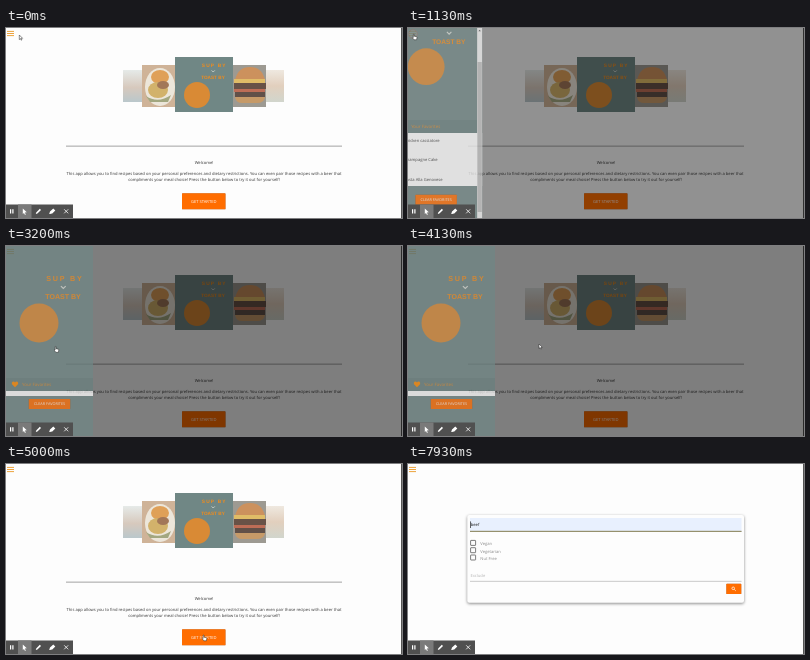
Animation of 396 by 190 pixels, one loop 8000 ms. Source, as an HTML page:

```html
<!DOCTYPE html>
<html lang="en">
<head>
<meta charset="utf-8">
<title>Recipe finder</title>
<style>
  html, body { margin: 0; width: 100%; height: 100%; overflow: hidden; background: #fdfdfd; }
  svg { display: block; width: 396px; height: 190px; }
  text { font: 4.12px "Open Sans", "Noto Sans", sans-serif; fill: #333; text-rendering: geometricPrecision; }
  .mid { text-anchor: middle; }
  .btn { fill: #ff6d00; filter: drop-shadow(0 .5px .6px #0006); }
  .btn-text { fill: #fff; text-anchor: middle; }
  .hint { fill: #b5b5b5; }
  .label { fill: #8a8a8a; }
  .brand { font: bold 4.8px "Liberation Sans", Arial, sans-serif; fill: #f28c1b; }
  .card { filter: drop-shadow(0 1px 1.8px #0007); }
</style>
</head>
<body>
<svg viewBox="0 0 396 190">
  <defs>
    <g id="logo">
      <rect width="58" height="55" fill="#708785"/>
      <circle cx="22" cy="38" r="13" fill="#d98a35"/>
      <text class="brand" x="26.8" y="10" letter-spacing="1.2">SUP BY</text>
      <path d="M36.6 13.4l1.6 1.6 1.6-1.6" fill="none" stroke="#d8dcd6" stroke-width=".8"/>
      <text class="brand" x="26.2" y="22" style="font-size:4.7px">TOAST BY</text>
    </g>
    <clipPath id="photo"><rect width="33" height="42"/></clipPath>
    <linearGradient id="warm" x2="0" y2="1">
      <stop stop-color="#d9c9b4"/><stop offset=".5" stop-color="#b98b5e"/><stop offset="1" stop-color="#8f9a84"/>
    </linearGradient>
    <linearGradient id="cool" x2="0" y2="1">
      <stop stop-color="#c9d3cf"/><stop offset=".55" stop-color="#a8896f"/><stop offset="1" stop-color="#68868f"/>
    </linearGradient>
  </defs>

  <g id="home">
    <rect x="117" y="42" width="19" height="32" fill="url(#cool)" opacity=".45"/>
    <rect x="260" y="42" width="18" height="32" fill="url(#warm)" opacity=".4"/>
    <g transform="translate(136 37)" clip-path="url(#photo)" opacity=".82">
      <rect width="33" height="42" fill="#c5a483"/>
      <ellipse cx="18" cy="22" rx="15" ry="19" fill="#e9e2d3"/>
      <ellipse cx="18" cy="12" rx="9" ry="7" fill="#d98c35"/>
      <ellipse cx="16" cy="25" rx="10" ry="8" fill="#c9a24c"/>
      <ellipse cx="21" cy="20" rx="6" ry="4" fill="#8f5a35"/>
      <path d="M4 31q12 8 25-1l-3 7H8z" fill="#8f9565"/>
    </g>
    <g transform="translate(227 37)" clip-path="url(#photo)" opacity=".85">
      <rect width="33" height="42" fill="#8d8980"/>
      <path d="M2 15Q5 2 17 2t15 13z" fill="#c47f42"/>
      <rect x="1" y="14" width="31" height="4" fill="#dbb14e"/>
      <rect x="1" y="18" width="32" height="6" fill="#4f3528"/>
      <rect x="1" y="24" width="31" height="3" fill="#b2543a"/>
      <rect x="2" y="27" width="30" height="5" fill="#463329"/>
      <path d="M2 32h30q-1 6-8 6H9q-6 0-7-6z" fill="#bd894f"/>
    </g>
    <use href="#logo" x="169" y="29"/>
    <rect x="60" y="117.7" width="276" height=".8" fill="#8c8c8c"/>
    <g class="mid">
      <text x="198" y="136">Welcome!</text>
      <text x="198" y="146.7">This app allows you to find recipes based on your personal preferences and dietary restrictions. You can even pair those recipes with a beer that</text>
      <text x="198" y="153.4">compliments your meal choice! Press the button below to try it out for yourself!</text>
    </g>
    <rect class="btn" x="176" y="165.3" width="43.5" height="16" rx=".6"/>
    <text class="btn-text" x="197.7" y="174.9">GET STARTED</text>
  </g>

  <g id="form">
    <rect class="card" x="59.3" y="51" width="276.7" height="87.8" rx="2" fill="#fdfdfd"/>
    <rect id="fill" x="62" y="54" width="271.5" height="13" fill="#e8f0fe"/>
    <text id="hint" class="hint" x="62.5" y="62.4">Main Ingredient</text>
    <text id="value" x="62.8" y="62.4" style="fill:#111">beef</text>
    <rect x="62" y="67" width="271.5" height=".6" fill="#a8a8a8"/>
    <rect id="line" x="62" y="66.8" width="271.5" height="1.1" fill="#8f8a63"/>
    <rect id="caret" x="62.2" y="57.4" width=".7" height="6.6" fill="#222"/>
    <g fill="none" stroke="#5c5c5c" stroke-width=".8">
      <rect x="62.6" y="76.4" width="5" height="5" rx=".4"/>
      <rect x="62.6" y="83.7" width="5" height="5" rx=".4"/>
      <rect x="62.6" y="91" width="5" height="5" rx=".4"/>
    </g>
    <text class="label" x="72.3" y="81.3">Vegan</text>
    <text class="label" x="72.3" y="88.5">Vegetarian</text>
    <text class="label" x="72.3" y="95.7">Nut Free</text>
    <text class="hint" x="62.5" y="112.5">Exclude</text>
    <rect x="62" y="116.9" width="271.5" height=".6" fill="#a8a8a8"/>
    <rect class="btn" x="318.3" y="119.8" width="15" height="10.3" rx=".6"/>
    <g fill="none" stroke="#fff" stroke-width=".7"><circle cx="325.2" cy="124.3" r="1.3"/><path d="M326.2 125.3l1.6 1.6"/></g>
  </g>

  <g fill="#eda33c">
    <rect x="1" y="2.9" width="7" height="1"/><rect x="1" y="5" width="7" height="1"/><rect x="1" y="7.1" width="7" height="1"/>
  </g>
  <rect x="395" width="1" height="190" fill="#555"/>
  <rect id="shade" width="396" height="190"/>

  <g id="panel" opacity=".72">
    <rect width="87" height="190" fill="#708785"/>
    <use id="panelLogo" href="#logo"/>
    <g id="favs">
      <rect y="132" width="87" height="13" fill="#68807e"/>
      <path d="M9 141.3l-2.8-2.9q-1.1-1.6.3-2.6 1.5-.8 2.5.7 1-1.5 2.5-.7 1.4 1 .3 2.6z" fill="#ff8a00"/>
      <text x="16" y="139.6" style="fill:#e08a2c;font-size:4.4px">Your Favorites</text>
      <rect id="listBox" y="145" width="87" fill="#fff"/>
      <g id="list">
        <text x="9" y="153.5">Chicken cacciatore</text>
        <text x="9" y="173.3">Champagne Cake</text>
        <text x="9" y="193">Pasta Alla Genovese</text>
      </g>
    </g>
    <g id="clear">
      <rect class="btn" x="-20.7" y="-5" width="41.4" height="10" rx=".6"/>
      <text class="btn-text" y="1.4" style="font-size:3.8px">CLEAR FAVORITES</text>
    </g>
    <g id="bar">
      <rect x="82" width="5" height="190" fill="#f1f1f1"/>
      <rect x="82.3" y="34" width="4.4" height="150" fill="#c1c1c1"/>
      <path d="M83.3 3.2h2.4l-1.2-1.4z" fill="#555"/>
    </g>
  </g>

  <g>
    <rect y="176.5" width="67" height="13.5" fill="#505050"/>
    <rect x="12" y="176.5" width="13.5" height="13.5" fill="#7a7a7a"/>
    <g fill="#fff">
      <path d="M4 181.2h1.2v4.2H4zM6.3 181.2h1.2v4.2H6.3z"/>
      <path d="M16.8 180.6l4 3.7-2 .2 1 2-.8.4-1-2-1.2 1.2z"/>
      <path d="M29.8 186l.4-1.6 3.6-3.6 1.2 1.2-3.6 3.6z"/>
      <path d="M43.2 186l.8-2.4 3.3-3 2 2-3 3-1.6.1-.3.3z"/>
    </g>
    <path d="M58.2 181.3l4 4m0-4l-4 4" stroke="#fff" stroke-width=".8"/>
  </g>

  <circle id="ring" fill="#fff6" stroke="#e0573a" stroke-width=".8"/>
  <g id="cursor" stroke-width=".5" stroke-linejoin="round">
    <path id="arrow" d="M0 0v4.6l1.1-1 .7 1.6.8-.3-.7-1.6h1.4z" fill="#fff" stroke="#222"/>
    <path id="hand" d="M.2 0q.7-.4.8.4v1.8l2.3.5q.6.2.5.8l-.4 2.3H.8L-.9 3.5q.2-.7 1 0z" fill="#fff" stroke="#222"/>
  </g>
</svg>
<script>
const LOOP = 8000, SWAP = 5400, CLEARED = 3000, FOCUS = 6400, PREVIEW = 6800;
const $ = id => document.getElementById(id);
const set = (id, attrs) => { for (const k in attrs) $(id).setAttribute(k, attrs[k]); };
const show = (id, on) => { $(id).style.display = on ? '' : 'none'; };
const clamp = v => Math.min(1, Math.max(0, v));
const outQuad = v => 1 - (1 - clamp(v)) ** 2;
const within = (t, a, b) => t >= a && t < b;

// time, x, y of the pointer tip
const path = [
  [0, 13.3, 7], [60, 13, 7], [530, 5.2, 6], [1130, 5.2, 6], [1730, 32.8, 70], [1860, 33, 72],
  [2060, 35, 82], [2200, 35, 84], [2660, 44, 169], [3000, 44, 169], [3200, 49, 100.5],
  [3800, 112, 94], [4130, 131, 98], [4330, 133, 99], [4400, 140.7, 103], [5000, 197, 171],
  [5400, 197, 171], [5950, 100, 61]
];
const clicks = [[930, 5, 6], [2900, 44, 169], [4290, 132.7, 99], [5250, 197, 171]];
const hands = [[400, 1180], [2520, 3260], [4900, 5400]];

function pointer(t) {
  const i = path.findIndex(p => p[0] > t);
  if (i < 0) return path.at(-1).slice(1);
  const [a, x, y] = path[i - 1], [b, u, v] = path[i];
  const k = (t - a) / (b - a), s = k * k * (3 - 2 * k);
  return [x + (u - x) * s, y + (v - y) * s];
}

function drawPanel(t) {
  const open = outQuad((t - 975) / 250) - outQuad((t - 4313) / 200);
  const full = t < CLEARED;
  const width = full ? 82 : 87, scroll = full ? 35 : 0;
  set('shade', { opacity: open / 2 });
  set('panel', { transform: `translate(${-91 * (1 - open)})` });
  set('panelLogo', { transform: `translate(0 ${20 - scroll}) scale(${width / 58})` });
  set('favs', { transform: `translate(0 ${full ? -40 : 0})` });
  set('listBox', { height: full ? 53 : 5 });
  set('clear', { transform: `translate(${width / 2} ${full ? 171.7 : 158})` });
  show('list', full);
  show('bar', full);
  show('panel', open > 0);
}

function drawForm(t) {
  const preview = t >= PREVIEW;
  show('home', t < SWAP);
  show('form', t >= SWAP);
  show('fill', preview);
  show('value', preview);
  show('hint', !preview);
  set('line', { opacity: clamp((t - FOCUS) / 300) });
  show('caret', within(t, FOCUS, PREVIEW) || within(t, 7200, 7330) || t >= 7930);
}

function drawPointer(t) {
  const hand = hands.some(([a, b]) => within(t, a, b));
  const click = clicks.find(c => within(t, c[0], c[0] + 220));
  set('cursor', { transform: `translate(${pointer(t)})` });
  show('cursor', t < 5950);
  show('hand', hand);
  show('arrow', !hand);
  show('ring', click);
  if (click) {
    const k = (t - click[0]) / 220;
    set('ring', { cx: click[1], cy: click[2], r: 1.5 + 3 * k, opacity: 1 - k ** 3 });
  }
}

function frame() {
  const t = performance.now() % LOOP;
  drawPanel(t);
  drawForm(t);
  drawPointer(t);
  requestAnimationFrame(frame);
}
frame();
</script>
</body>
</html>
```
